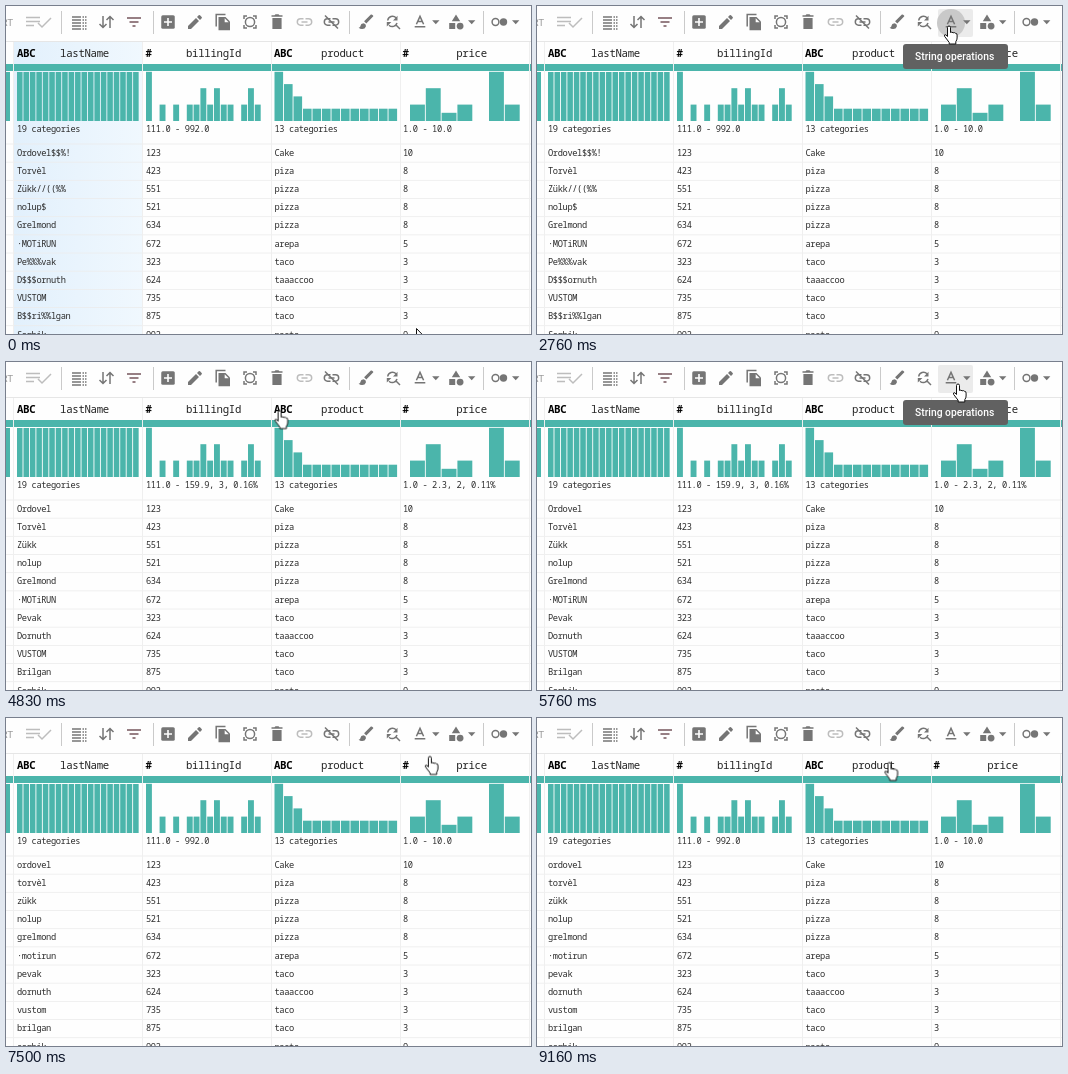
An HTML page that plays this animation: 525x328 px, repeating every 9330 ms.

```html
<!DOCTYPE html>
<html lang="en">
<head>
<meta charset="utf-8">
<title>Column cleaning</title>
<style>
html, body { margin: 0; width: 100%; height: 100%; overflow: hidden; background: #fefefe; }
svg { display: block; width: 525px; height: 328px; }
.mono { font: 8.7px "Noto Sans Mono", "DejaVu Sans Mono", monospace; letter-spacing: -.36px; fill: #2b2b2b; }
.head { font-size: 10.7px; letter-spacing: -.3px; fill: #222; }
.kind { font-weight: 700; fill: #000; }
.ui { font: 9.9px Roboto, Arial, sans-serif; fill: #2c2c2c; }
.tip { font-size: 10.3px; font-weight: 500; fill: #fff; }
.teal { fill: #4bb5ab; }
#icons { fill: #757575; color: #757575; }
.line { fill: none; stroke: currentColor; stroke-width: 1.5; }
.pale { color: #bdbdbd; }
.wine { color: #75555c; }
.panel { filter: drop-shadow(0 2px 2px rgba(0,0,0,.25)) drop-shadow(0 3px 5px rgba(0,0,0,.25)); }
</style>
</head>
<body>
<svg id="stage" viewBox="0 0 525 328" xmlns="http://www.w3.org/2000/svg"></svg>
<script>
const LOOP = 9330;
const FLOOR = 115;
const stage = document.getElementById('stage');

const text = (x, y, s, cls = 'mono') => `<text x="${x}" y="${y}" class="${cls}">${s}</text>`;
const rect = (x, y, w, h, fill, more = '') =>
  `<rect x="${x}" y="${y}" width="${w}" height="${h}" fill="${fill}" ${more}/>`;
const teal = (x, y, w, h) => `<rect x="${x}" y="${y}" width="${w}" height="${h}" class="teal"/>`;
const group = (id, body) => `<g id="${id}">${body}</g>`;

// Table
const raw = ['Ordovel$$%!', 'Torvèl', 'Zükk//((%%', 'nolup$', 'Grelmond', '·MOTiRUN',
  'Pe%%%vak', 'D$$$ornuth', 'VUSTOM', 'B$$ri%%lgan', 'Sorbik'];
const clean = raw.map(s => s.replace(/[$%!\/()]/g, ''));
const lower = clean.map(s => s.toLowerCase());
const ids = '123 423 551 521 634 672 323 624 735 875 992'.split(' ');
const foods = 'Cake piza pizza pizza pizza arepa taco taaaccoo taco taco pasta'.split(' ');
const prices = '10 8 8 8 8 5 3 3 3 3 9'.split(' ');

const rowY = i => 149.8 + i * 18.17;
const column = (x, list) => list.map((s, i) => text(x, rowY(i), s)).join('');

// One digit per bin, `unit` pixels per count
const bars = (x, pitch, digits, unit) => [...digits].map((d, i) =>
  +d ? teal(x + i * pitch, FLOOR - d * unit, pitch - .9, d * unit) : '').join('');

function table() {
  const edge = i => 7 + i * 129;
  let out = '<linearGradient id="blue"><stop stop-color="#e2f0fc"/><stop offset="1" stop-color="#f0f8fe"/></linearGradient>';
  out += rect(8, 36, 128, 292, 'url(#blue)', 'id="tint"') + rect(0, 35, 525, 1, '#e6e6e6');
  raw.forEach((_, i) => { out += rect(0, rowY(i) - 12.2, 525, .8, '#ececec'); });
  out += teal(0, 58, 525, 7) + teal(0, 66, 4, 49);
  ['lastName', 'billingId', 'product', 'price'].forEach((name, i) => {
    const x = edge(i) + 4 - i / 2;
    out += text(x, 51, i % 2 ? '#' : 'ABC', 'mono head kind');
    out += `<text x="${edge(i) + 71.5}" y="51" class="mono head" text-anchor="middle">${name}</text>`;
  });
  for (let i = 0; i < 5; i++) out += rect(edge(i), 36, 1, 292, '#efefef');
  out += bars(11, 6.45, '1'.repeat(19), 49);
  out += bars(140, 6.8, '30101011212110121', 16.4);
  out += bars(268.5, 9.5, '432' + '1'.repeat(10), 12.3);
  out += bars(404, 15.8, '2412062', 8.2);
  out += text(11, 126, '19 categories') + text(268.5, 126, '13 categories');
  out += group('idAll', text(140, 126, '111.0 - 992.0'));
  out += group('idBin', text(140, 126, '111.0 - 159.9, 3, 0.16%'));
  out += group('priceAll', text(397, 126, '1.0 - 10.0'));
  out += group('priceLow', text(397, 126, '1.0 - 2.3, 2, 0.11%'));
  out += group('priceMid', text(397, 126, '4.9 - 6.1, 2, 0.11%'));
  out += group('raw', column(11, raw)) + group('clean', column(11, clean)) + group('lower', column(11, lower));
  return out + column(140, ids) + column(268.5, foods) + column(397, prices);
}

// Icons are drawn around their own centre
const icon = (x, body, cls = '') => `<g transform="translate(${x} 16)" class="${cls}">${body}</g>`;
const line = d => `<path class="line" d="${d}"/>`;
const fill = (d, color = 'currentColor') => `<path d="${d}" fill="${color}"/>`;
const dot = (x, y, r, cls = '') => `<circle cx="${x}" cy="${y}" r="${r}" class="${cls}"/>`;

function toolbar() {
  const link = line('M-1-3.2h-3a3.2 3.2 0 0 0 0 6.4h3M1-3.2h3a3.2 3.2 0 0 1 0 6.4h-3M-3 0h6');
  const caret = fill('M-3.7-1.8h7.4L0 2.2z');
  let out = rect(401, 3, 35, 28, '#ebebeb', 'id="hover" rx="2"');
  out += '<circle id="ripple" cx="414" cy="17" r="14" fill="#c9c9c9"/><g id="icons">';
  for (const x of [55, 147, 343, 477]) out += rect(x, 5, 1, 23, '#cacaca');
  out += '<text x="-4.5" y="20" class="ui" style="fill:#999">RT</text>';
  out += icon(33, line('M-13-4.5h14M-13-.5h14M-13 3.5h8M-1 1l4 4 9-9'), 'pale');
  for (let y = -5; y < 8; y += 3) out += icon(73, line(`M-7 ${y}h9M3.5 ${y}h1.5M6 ${y}h1.5`));
  out += icon(100, line('M-3-6V5M-6.5 2L-3 5.5.5 2M4 6V-5M.5-2L4-5.5 7.5-2'));
  out += icon(128, line('M-7-4h14M-4.5 0h9M-1.5 4h3'), 'wine');
  out += icon(162, rect(-6.75, -6.75, 13.5, 13.5, 'currentColor', 'rx="1.5"') +
    fill('M-4-.8h3.2V-4H.8v3.2H4V.8H.8V4H-.8V.8H-4z', '#fefefe'));
  out += icon(189, fill('M-7 7V4L1-4l3 3-8 8zM2-5l1.7-1.7q.7-.5 1.3 0l1.7 1.7q.5.6 0 1.3L5-2z'));
  out += icon(216.5, line('M-6.3 4.5V-7.5H3') + fill('M-4-5h7l4.5 4.5V8.2H-4z') + fill('M2.2-3.8v4h4z', '#fefefe'));
  out += icon(244, dot(0, 0, 4.6, 'line') + line('M-6-3v-3h3M3-6h3v3M6 3v3H3M-3 6h-3V3'));
  out += icon(271, fill('M-4.6-4h9.2V7h-9.2zM-5.5-6.8h3l1-.9h3l1 .9h3v1.6h-11z'));
  out += icon(298.5, link, 'pale') + icon(325.5, link + line('M-6.5-6.5l13 13'));
  out += icon(360, fill('M6.8-6.8q1 .6.3 1.4L.3 1.4l-2.2-2.2 6.8-6.6q.8-.4 1.9.6zM-2.5 1.3q2.6.6 2.4 3.2-1 2.8-4 2.6-2 0-3.3-1.5 1.8 0 1.8-1.7.4-2.4 3.1-2.6z'));
  out += icon(387, line('M-5.3-1.5A4.8 4.8 0 0 1 3-4.2M4 1A4.8 4.8 0 0 1-4 3.2M3 3l4 4') + fill('M4.5-6.2v4.7H0zM-6.2 4.5V0h4.6z'));
  out += icon(414, line('M-3.6 2.2L0-5.6l3.6 7.8M-2.4-.6h4.8M-5.3 4.8H5.3'));
  out += icon(450, fill('M0-7.5l4.2 6.8h-8.4zM-6.8 1h6v6h-6z') + dot(4.1, 4.1, 3.4));
  out += icon(494, dot(-4.5, 0, 3.4, 'line') + dot(3.5, 0, 3.7));
  out += `<g id="caret" color="#757575">${icon(429.8, caret)}</g>` + icon(465.7, caret) + icon(509.7, caret);
  return out + '</g>';
}

function overlays() {
  const items = ['To lower case', 'To upper case', 'Remove accents', 'Remove special chars', 'Trim white space'];
  const itemY = i => 52 + i * 31.7;
  const pick = (id, i) => rect(400.5, itemY(i) - 15.3, 121.5, 31, '#bdbdbd', `id="${id}"`);
  let menu = rect(400.5, 30.5, 121.5, 170.5, '#fff', 'class="panel" rx="3"');
  menu += pick('pickLower', 0) + pick('pickSpecial', 3);
  items.forEach((s, i) => { menu += group('item' + i, text(412.5, itemY(i) + 3.7, s, 'ui')); });
  return group('tip', rect(366, 38, 105, 25, '#616161', 'rx="3"') + text(378, 54, 'String operations', 'ui tip')) +
    group('menu', menu) +
    `<g id="cursor" stroke="#111" fill="#fff" stroke-linejoin="round">
      <path id="arrow" d="M.5.5V13l2.9-2.7 2 4.6 2-.9-2-4.4h3.9z"/>
      <path id="hand" d="M-1.5 1.5a1.5 1.5 0 0 1 3 0V6.5q1.3-.9 2.6.3 1.3-.7 2.4.5 1.6-.2 1.6 1.8V12q0 2-1.3 3.6V18H.2v-1.6l-4.6-6q-.7-2 1.2-1.7L-1.5 10.5z"/>
    </g>`;
}

stage.innerHTML = table() + toolbar() + overlays();

// Keyframes, timed in milliseconds
const sheet = [];
function track(id, stops, ease) {
  const last = stops[stops.length - 1][1];
  const frames = [...stops, [LOOP, last]].map(([ms, css]) => `${(ms / LOOP * 100).toFixed(3)}%{${css}}`);
  sheet.push(`@keyframes ${id}{${frames.join('')}}#${id}{animation:${id} ${LOOP}ms ${ease} infinite}`);
}
// Hard switch to `on` inside each span
function switchOn(id, on, off, ...spans) {
  const stops = spans.flatMap(([a, b]) => [[a, on], [b, off]]).filter(([ms]) => ms < LOOP);
  track(id, spans[0][0] ? [[0, off], ...stops] : stops, 'step-end');
}
const show = (id, ...spans) => switchOn(id, 'opacity:1', 'opacity:0', ...spans);
// Soft switch: each span starts fading in at a and out at b
const fade = (id, ramp, ...spans) => track(id, [[0, 'opacity:0'], ...spans.flatMap(([a, b]) =>
  [[a, 'opacity:0'], [a + ramp, 'opacity:1'], [b, 'opacity:1'], [b + ramp, 'opacity:0']])], 'linear');

const CLEANED = 4560, LOWERED = 7000;
show('raw', [0, CLEANED]);
show('clean', [CLEANED, LOWERED]);
show('lower', [LOWERED, LOOP]);
show('idAll', [0, CLEANED], [LOWERED, LOOP]);
show('idBin', [CLEANED, LOWERED]);
show('priceAll', [0, 4400], [LOWERED, LOOP]);
show('priceLow', [4400, 6760]);
show('priceMid', [6760, LOWERED]);

// The menu is opened and closed three times
const visits = [[2760, 4230], [5870, 6700], [7640, 8530]];
const [special, lowering, accents] = visits;
fade('menu', 165, ...visits.map(([open, close]) => [open + 60, close]));
fade('ripple', 100, ...visits.map(([open]) => [open - 100, open + 100]));
fade('hover', 110, ...[special, lowering].map(([open]) => [open - 450, open + 60]), [accents[0] - 110, accents[1]]);
fade('tip', 130, ...[special, lowering].map(([open]) => [open - 450, open + 60]));
fade('pickSpecial', 600, [3500, special[1]]);
fade('pickLower', 400, [6250, lowering[1]]);
switchOn('caret', 'color:#222', 'color:#757575', accents);
const BOLD = 'stroke:#2c2c2c;stroke-width:.3px', PLAIN = 'stroke:none';
switchOn('item3', BOLD, PLAIN, [3930, CLEANED]);
switchOn('item0', BOLD, PLAIN, [accents[0], LOOP - 300]);
track('tint', [[0, 'opacity:1'], [30, 'opacity:1'], [200, 'opacity:0']], 'linear');

// Pointer: each move starts, ends, and lands at x, y
const moves = [
  [30, 760, 66, 29], [760, 960, 63, 48], [1430, 2500, 412, 20], [2860, 3630, 464, 150],
  [4230, 4660, 105, 62], [4660, 4860, 281, 48], [4930, 5560, 421, 22], [5800, 6400, 456, 50],
  [6700, 6860, 457.5, 144.5], [7230, 7600, 418, 20], [7740, 8160, 478, 138],
  [8200, 8330, 470, 118.5], [8530, 9160, 352.5, 44.5]
];
const place = (x, y) => `transform:translate(${x}px,${y}px)`;
let at = place(410, 322);
const stops = [[0, at]];
for (const [from, to, x, y] of moves) {
  stops.push([from, at]);
  stops.push([to, at = place(x, y)]);
}
track('cursor', stops, 'ease-in-out');
const overCells = [[0, 720], [4260, 4400], [6740, 7420]];
switchOn('arrow', 'opacity:1', 'opacity:0', ...overCells);
switchOn('hand', 'opacity:0', 'opacity:1', ...overCells);

const style = document.createElement('style');
style.textContent = sheet.join('\n');
document.head.append(style);
</script>
</body>
</html>
```
